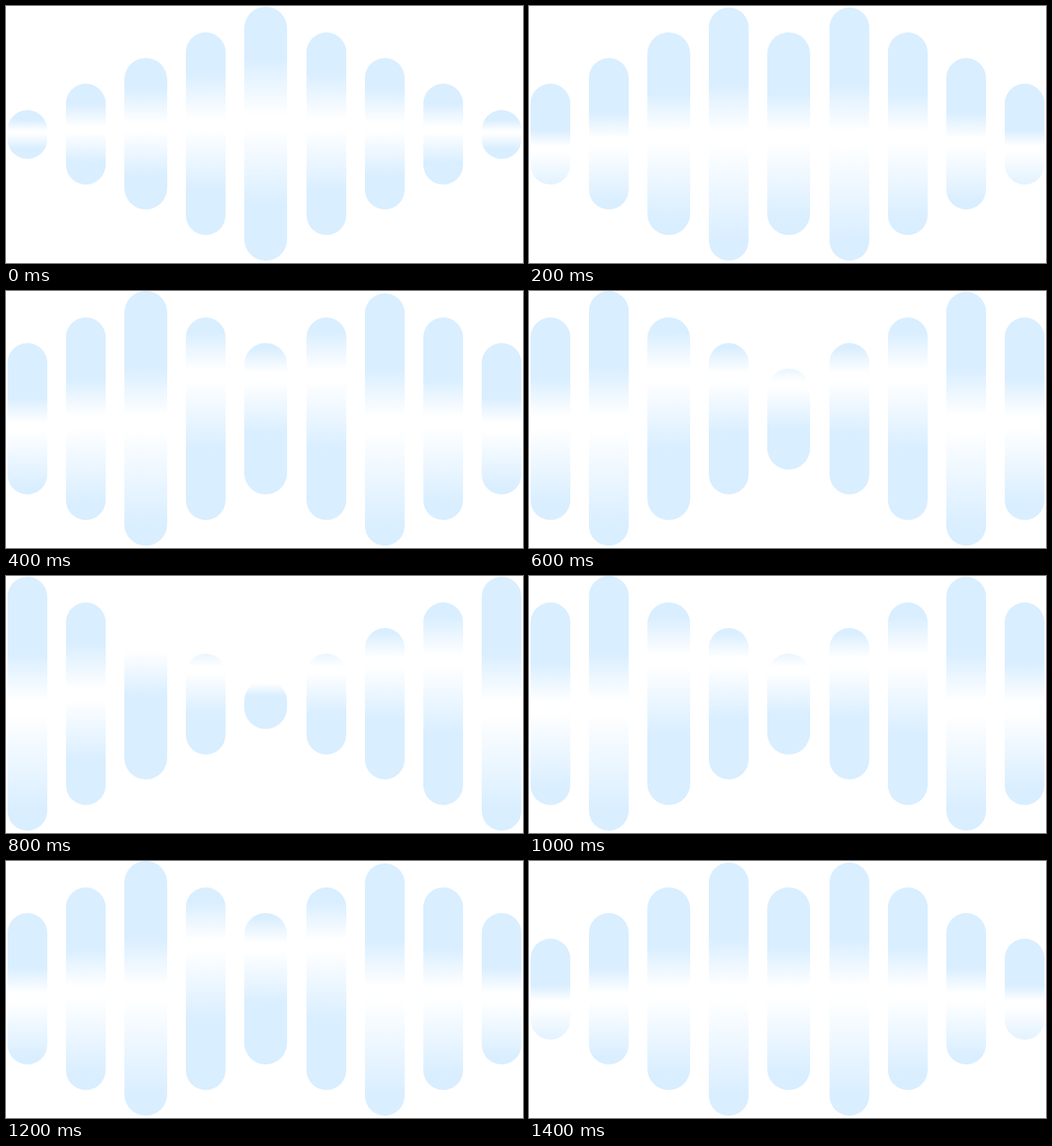
Write an HTML page with a canvas that moves like this. It is 664 px wide and 331 px high and loops after 1600 ms.

```html
<!DOCTYPE html>
<html lang="en">
<head>
<meta charset="utf-8">
<title>Sound bars</title>
<style>
  html, body { margin: 0; width: 100%; height: 100%; overflow: hidden; background: #fff; }
  canvas { display: block; }
</style>
</head>
<body>
<canvas id="stage" width="664" height="331"></canvas>
<script>
const ctx = document.getElementById('stage').getContext('2d');
const BLUE = '#d9eeff', WHITE = '#fff';
const STEP = 200, LOOP = 1600;

const lefts = [2, 77, 152, 231, 306, 386, 461, 536, 611];
const widths = [51, 51, 55, 51, 55, 51, 51, 51, 51];
const peakTops = [1, 0, 0, 2, 1, 2, 3, 1, 1];
const tops = [134, 100, 67, 34];
const bottoms = [197, 230, 262, 295, 328];

// Shine profiles: end of upper blue, start of white, start of lower blue,
// as fractions of the bar height.
const shines = {
  A: [.2, .43, .78],
  B: [.3, .49, .92],
  C: [.36, .53, .95],
  D: [.46, .62, 1.1],
  E: [.07, .26, .65],
  F: [.03, .2, .6],
  G: [-.1, .13, .6],
  H: [-5, .1, .45],
  I: [-5, .02, .32]
};
const poses = ['AAAAAAAAA', 'DCBBBBBCD', 'CBBEFEBBC', 'BBEFGFEBB', 'BAHGIGFEB'];

function drawBar(i, pose) {
  // The peak travels outwards from the middle, one bar per pose.
  const level = 4 - Math.abs(Math.abs(i - 4) - pose);
  const x = lefts[i], w = widths[i];
  const top = level === 4 ? peakTops[i] : tops[level];
  const h = bottoms[level] - top;
  const [a, b, c] = shines[poses[pose][i]];

  const fill = ctx.createLinearGradient(0, top + a * h, 0, top + c * h);
  fill.addColorStop(0, BLUE);
  fill.addColorStop((b - a) / (c - a), WHITE);
  fill.addColorStop((b + .05 - a) / (c - a), WHITE);
  fill.addColorStop(1, BLUE);

  ctx.fillStyle = fill;
  ctx.beginPath();
  ctx.roundRect(x, top, w, h, w / 2);
  ctx.fill();
}

const start = performance.now();
function draw() {
  const time = Math.max(0, performance.now() - start) % LOOP;
  const step = Math.floor(time / STEP);
  const pose = Math.min(step, 8 - step);
  ctx.clearRect(0, 0, 664, 331);
  lefts.forEach((_, i) => drawBar(i, pose));
  requestAnimationFrame(draw);
}
draw();
</script>
</body>
</html>
```
